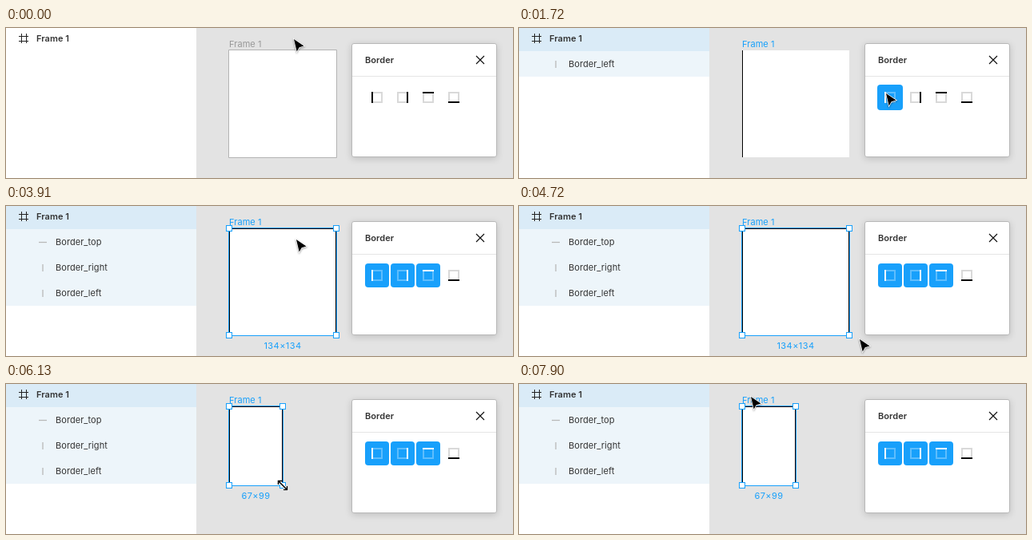
Write an HTML page that moves like this. It is 634 px wide and 188 px high and loops after 7.99 s.

```html
<!DOCTYPE html>
<html lang="en">
<head>
<meta charset="utf-8">
<title>Border plugin demo</title>
<style>
  html, body { margin: 0; width: 100%; height: 100%; overflow: hidden; background: #e3e3e3; }
  svg { display: block; width: 634px; height: 188px; }
  text { font: 11px Inter, sans-serif; letter-spacing: .055px; fill: #333; }
  .bold { font-weight: 600; }
  .blue { fill: #18a0fb; }
  .ring { fill: none; stroke: #18a0fb; }
  .handle { fill: #fff; stroke: #18a0fb; }
  .icon { fill: none; stroke: #222; }
  .panel { filter: drop-shadow(0 2px 4px rgba(0, 0, 0, .16)); }
  .box { fill: none; stroke: #d9d9d9; stroke-width: 2; }
  .on .box { stroke: #fff; stroke-opacity: .3; }
  .on .bar { fill: #fff; }
  .btn .bg { fill: none; }
  .btn.hover .bg { stroke: #18a0fb; stroke-width: 2; }
  .btn.on .bg { fill: #18a0fb; }
  .arrow { filter: drop-shadow(0 1px 1.2px rgba(0, 0, 0, .4)); }
  .off { display: none; }
</style>
</head>
<body>
<svg viewBox="0 0 634 188" xmlns="http://www.w3.org/2000/svg">
  <rect width="634" height="188" fill="#e3e3e3"/>

  <g id="stage">
    <rect id="page" x="279" y="28" fill="#fff"/>
    <path id="edge" fill="none" stroke="#b3b3b3"/>
    <rect id="left" class="line" x="279" y="28" width="1"/>
    <rect id="right" class="line" y="28"/>
    <rect id="top" class="line" x="279" y="28" height="1"/>
    <text id="name" x="279" y="24">Frame 1</text>
    <rect id="glow" class="ring" x="279" y="28" stroke-width="2"/>
    <g id="snap" stroke="#f24822" fill="none"></g>
    <g id="select">
      <rect id="outline" class="ring" x="278.5" y="27.5"/>
      <g id="handles"></g>
      <g id="marks" stroke="#f24822" fill="none"></g>
      <text id="size" class="blue" text-anchor="middle" style="letter-spacing:.45px"></text>
    </g>
  </g>

  <g id="layers">
    <rect width="238" height="188" fill="#fff"/>
    <rect id="parentBg" width="238" height="29" fill="#daebf7"/>
    <rect id="childBg" y="29" width="238" fill="#edf5fa"/>
    <path class="icon" d="M19.5 7v12M25.500 7v12M16 10.500h12M16 16.500h12"/>
    <text class="bold" x="38" y="17">Frame 1</text>
    <g id="rows"></g>
    <g id="rowHover">
      <rect id="rowRing" class="ring" x=".5" width="237" height="31"/>
      <g id="tools">
        <rect x="194" y="77" width="7" height="6" rx=".6" fill="#222"/>
        <path class="icon" d="M199.500 77v-3a2 2 0 0 1 4 0v2"/>
        <path class="icon" stroke-width="1.2" d="M211.600 77q6.400-8.400 12.800 0q-6.400 8.400-12.800 0z"/>
        <circle cx="218" cy="77" r="2" fill="#222"/>
      </g>
    </g>
  </g>

  <g>
    <rect class="panel" x="432.500" y="19.500" width="181" height="142" rx="2.500" fill="#fff" stroke="#b8b8b8"/>
    <path d="M433 60.500h180" stroke="#e5e5e5"/>
    <text class="bold" x="449" y="44">Border</text>
    <path d="M588 35l10 10m0-10l-10 10" stroke="#111" stroke-width="1.200"/>
    <g id="buttons"></g>
  </g>

  <g id="cursor">
    <path class="arrow" id="arrow" d="M0 0L12.500 8.500 6.700 10.200 3.700 15.500Z" stroke="#fff" stroke-width="1.500" paint-order="stroke"/>
    <g id="resize" fill="none">
      <path d="M-5-5L5 5M-5.500-1v-4.500h4.500M5.500 1v4.500h-4.500" stroke="#fff" stroke-width="3.500"/>
      <path d="M-5-5L5 5M-5.500-1v-4.500h4.500M5.500 1v4.500h-4.500" stroke="#000" stroke-width="1.500"/>
    </g>
  </g>
</svg>
<script>
const LOOP = 7990, X = 279, Y = 28;
const $ = id => document.getElementById(id);
const show = (el, on) => el.classList.toggle('off', !on);
const set = (el, attrs) => { for (const k in attrs) el.setAttribute(k, attrs[k]); };
function add(parent, tag, attrs) {
  const el = document.createElementNS('http://www.w3.org/2000/svg', tag);
  set(el, attrs);
  return parent.appendChild(el);
}

// Cursor path: step, x, y
const path = [
  [0, 360, 14], [1, 360, 14], [3, 366, 42], [5, 372, 66], [7, 372, 66],
  [11, 425, 78], [14, 459, 82], [21, 459, 82], [24, 493, 85], [31, 493, 85],
  [35, 511, 95], [38, 513, 94], [39, 516, 94], [40, 516, 94], [41, 520, 92],
  [43, 520, 92], [45, 363, 42], [49, 195, 8], [50, 195, 8], [52, 432, 170],
  [53, 432, 170], [56, 413, 162], [58, 410, 160], [60, 413, 162], [61, 413, 162],
  [62, 402, 162], [63, 377, 155], [65, 354, 139], [69, 346, 127], [71, 346, 127],
  [74, 375, 133], [76, 375, 133], [79, 295, 95], [81, 292, 97], [82, 284, 110],
  [84, 288, 30], [85, 290, 10], [86, 290, 10], [88, 290, 16], [91, 290, 16]
];

function cursorAt(n) {
  const i = Math.max(1, path.findIndex(p => p[0] >= n));
  const [a, b] = [path[i - 1], path[i]];
  const k = (n - a[0]) / (b[0] - a[0]);
  return [1, 2].map(j => Math.round(a[j] + (b[j] - a[j]) * k));
}

const stepAt = t => Math.min(90, Math.floor(.16 + (t < 3293 ? t / 86.65 : 38 + (t - 3293) / 88.6)));

const within = (n, a, b) => n >= a && n <= b;

function hoverAt(n) {
  if (within(n, 3, 6) || within(n, 87, 89)) return 'page';
  if (within(n, 78, 79)) return 'right';
  if (within(n, 82, 83)) return 'left';
  return n === 84 ? 'top' : '';
}

const sides = [
  { id: 'left', from: 17, bar: [-7, -7, 2, 14] },
  { id: 'right', from: 29, bar: [5, -7, 2, 14] },
  { id: 'top', from: 43, bar: [-7, -7, 14, 2] },
  { id: 'bottom', from: Infinity, bar: [-7, 5, 14, 2] }
];

sides.forEach((s, i) => {
  s.cx = 464 + 32 * i;
  s.btn = add($('buttons'), 'g', { class: 'btn', transform: `translate(${s.cx} 87)` });
  add(s.btn, 'rect', { class: 'bg', x: -15, y: -15, width: 30, height: 30, rx: 4 });
  add(s.btn, 'rect', { class: 'box', x: -6, y: -6, width: 12, height: 12 });
  const [x, y, width, height] = s.bar;
  add(s.btn, 'rect', { class: 'bar', x, y, width, height });
  if (s.from === Infinity) return;
  s.row = add($('rows'), 'g', {});
  add(s.row, 'path', { d: s.id === 'top' ? 'M41 .5h10' : 'M46-4v9', stroke: '#b8b8b8', 'stroke-width': 1.3 });
  add(s.row, 'text', { x: 62, y: 4 }).textContent = 'Border_' + s.id;
});

const handles = [0, 1, 2, 3].map(() => add($('handles'), 'rect', { class: 'handle', width: 7, height: 7 }));
const snapLine = add($('snap'), 'path', { d: 'M279 162.500H413' });
const marks = add($('marks'), 'path', {});

function draw(n) {
  const [cx, cy] = cursorAt(n);
  const [ex, ey] = n < 62 ? [413, 162] : n < 72 ? cursorAt(n - 1) : [346, 127];
  const w = ex - X, h = ey - Y;
  const selected = within(n, 7, 74) || n === 90;
  const active = selected && !within(n, 17, 43);
  const hover = hoverAt(n);
  const count = sides.filter(s => n >= s.from).length;

  set($('page'), { width: w, height: h });
  set($('edge'), { d: count ? `M${X} ${ey + .5}h${w}` : `M278.500 27.500h${w + 1}v${h + 1}h${-w - 1}z` });
  show($('edge'), !selected);
  set($('left'), { height: h });
  const thick = hover === 'right' ? 2 : 1;
  set($('right'), { x: ex - 1, width: thick, height: h });
  set($('top'), { width: w });
  set($('glow'), { width: w, height: h });
  show($('glow'), hover === 'page');
  $('name').style.fill = selected || hover === 'page' ? '#18a0fb' : '#999';

  show($('select'), active);
  set($('outline'), { width: w + 1, height: h + 1 });
  handles.forEach((el, i) => set(el, { x: (i % 2 ? ex : X) - 3.5, y: (i > 1 ? ey : Y) - 3.5 }));
  set($('size'), { x: X + w / 2, y: ey + 17 });
  $('size').textContent = `${w}×${h}`;
  const snapped = within(n, 62, 63) && h === 134;
  show(snapLine, snapped);
  show(marks, snapped);
  set(marks, { d: [X, ex, 411].map(x => `M${x - 2} 160l4 4m0-4l-4 4`).join('') });

  show($('parentBg'), selected);
  show($('childBg'), selected);
  set($('childBg'), { height: 32 * count });
  sides.forEach((s, i) => {
    const on = n >= s.from;
    s.btn.classList.toggle('on', on);
    const over = cx >= s.cx - 16 && cx < s.cx + 16 && within(cy, 71, 103);
    s.btn.classList.toggle('hover', over);
    const bg = s.btn.firstChild;
    const r = over && on ? 16 : 15;
    set(bg, { x: -r, y: -r, width: 2 * r, height: 2 * r });
    bg.style.strokeWidth = over && on ? 0 : 2;
    if (!s.row) return;
    s.y = 45 + 32 * (count - 1 - i);
    set(s.row, { transform: `translate(0 ${s.y})` });
    show(s.row, on);
    const line = $(s.id);
    show(line, on);
    line.style.fill = hover === s.id ? '#18a0fb' : '#000';
  });

  show($('rowHover'), hover);
  const side = sides.find(s => s.id === hover);
  const rowY = side ? side.y : 13;
  set($('rowRing'), { y: rowY - 15.5 });
  set($('tools'), { transform: `translate(0 ${rowY - 77})` });

  const sizing = within(n, 55, 71);
  show($('arrow'), !sizing);
  show($('resize'), sizing);
  set($('cursor'), { transform: `translate(${cx} ${cy})` });
}

let last = -1;
function tick() {
  const n = stepAt(performance.now() % LOOP);
  if (n !== last) draw(last = n);
  requestAnimationFrame(tick);
}
tick();
</script>
</body>
</html>
```
